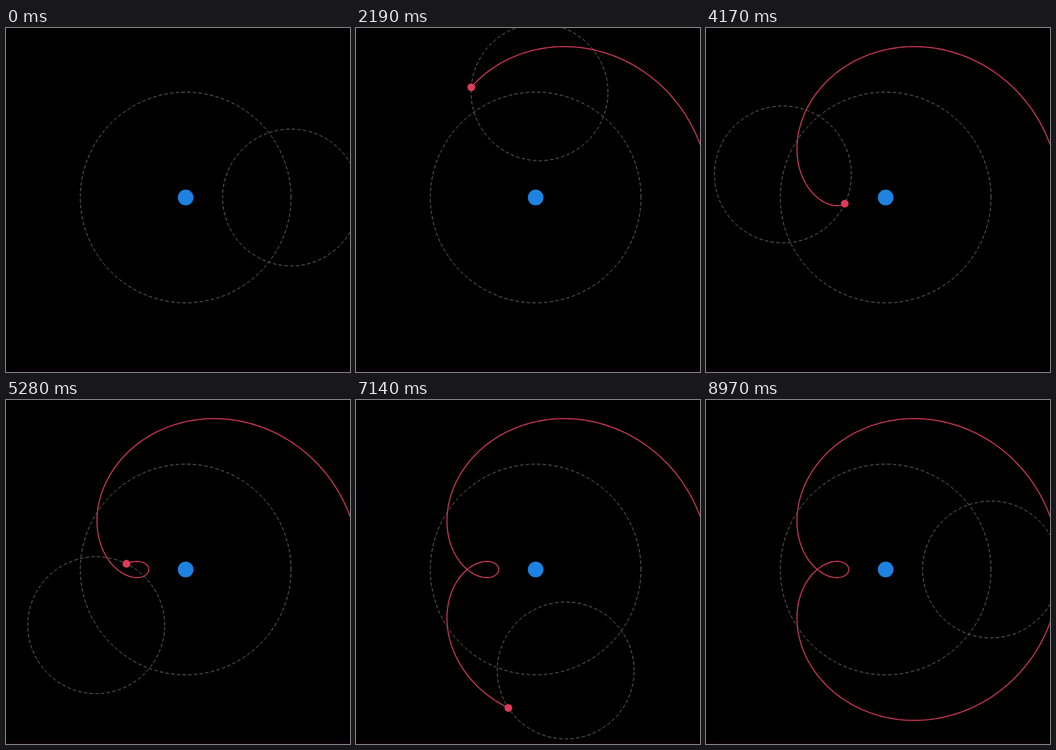
These frames come from a looping animation (480 by 480 pixels, 9 s). An HTML page with a canvas:

```html
<!DOCTYPE html>
<html lang="en">
<head>
<meta charset="utf-8">
<title>Epicycle</title>
<style>
html, body { margin: 0; width: 100%; height: 100%; overflow: hidden; background: #000; }
canvas { display: block; }
</style>
</head>
<body>
<canvas id="stage" width="480" height="480"></canvas>
<script>
const ctx = document.getElementById('stage').getContext('2d');
const TAU = Math.PI * 2, STEPS = 300, STEP_MS = 30;
const centre = [250.7, 236.5];
const RED = '#dc3c5a', BLUE = '#1e82e1';

const polar = ([x, y], r, a) => [x + r * Math.cos(a), y - r * Math.sin(a)];
const angle = i => i / (STEPS - 1) * TAU;
const carrier = i => polar(centre, 147, angle(i));
const planet = i => polar(carrier(i), 95.5, 2 * angle(i));

function orbit([x, y], r) {
  ctx.beginPath();
  ctx.arc(x, y, r, 0, -TAU, true);
  ctx.setLineDash([4.8, 3.2]);
  ctx.lineWidth = 0.9;
  ctx.strokeStyle = '#7c7c7c';
  ctx.stroke();
  ctx.setLineDash([]);
}

function dot([x, y], r, colour) {
  ctx.beginPath();
  ctx.arc(x, y, r, 0, TAU);
  ctx.fillStyle = colour;
  ctx.fill();
}

function draw(now) {
  const step = Math.floor(now / STEP_MS) % STEPS;
  ctx.fillStyle = '#000';
  ctx.fillRect(0, 0, 480, 480);
  ctx.fillStyle = '#080004';
  ctx.fillRect(0, 476, 480, 4);

  orbit(centre, 147);
  orbit(carrier(step), 95.5);

  ctx.beginPath();
  for (let i = 0; i <= step; i++) ctx.lineTo(...planet(i));
  ctx.lineWidth = 1.4;
  ctx.lineJoin = 'round';
  ctx.strokeStyle = RED;
  ctx.stroke();

  dot(centre, 10.9, BLUE);
  dot(planet(step), 5.4, RED);
}

let start;
function tick(now) {
  start ??= now;
  draw(now - start);
  requestAnimationFrame(tick);
}
draw(0);
requestAnimationFrame(tick);
</script>
</body>
</html>
```
